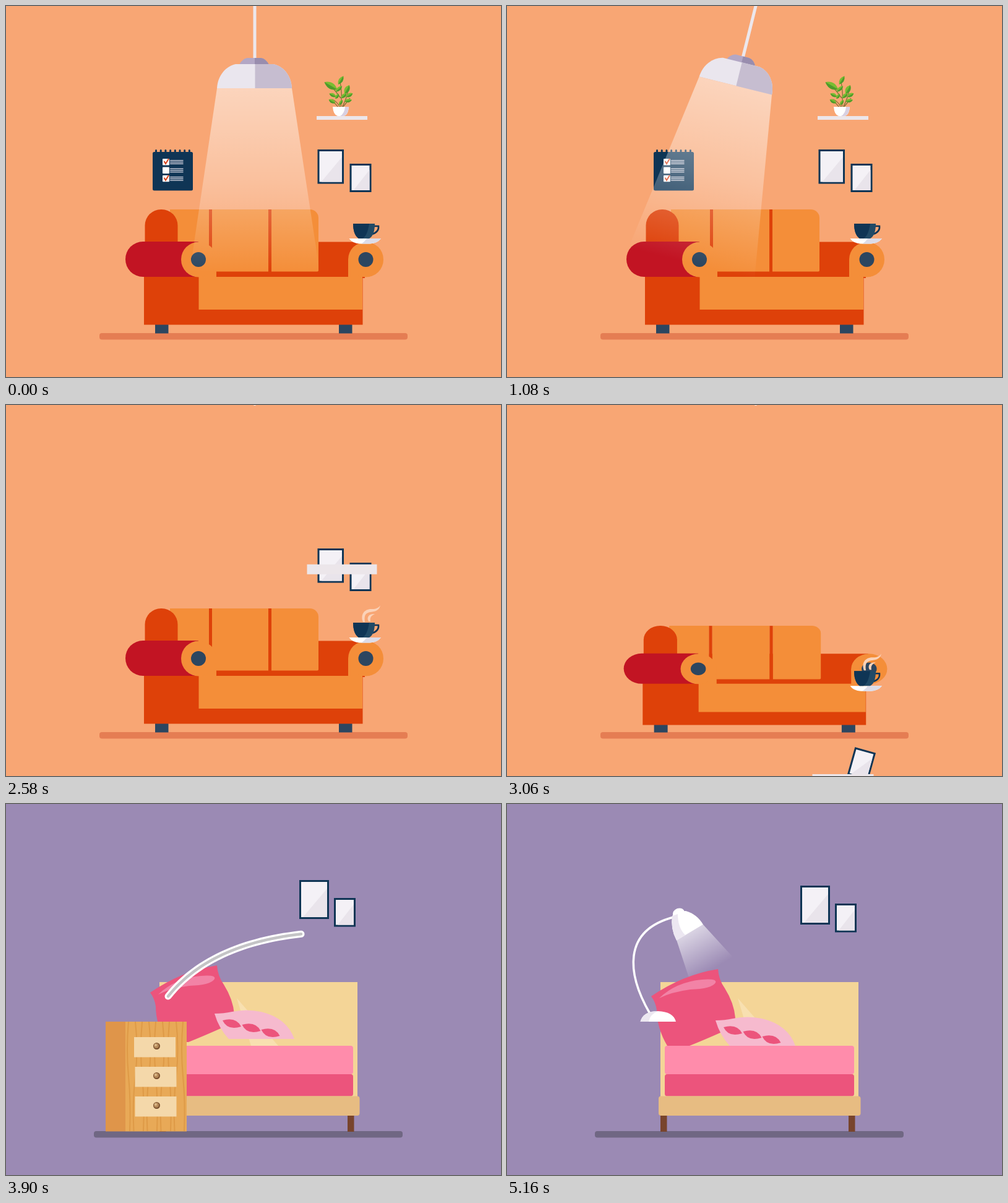
An HTML page with a canvas for the animation above (5.19 s loop, 800 by 600 pixels).

```html
<!DOCTYPE html>
<html lang="en">
<head>
<meta charset="utf-8">
<title>Living room to bedroom</title>
<style>
html, body { margin: 0; width: 100%; height: 100%; overflow: hidden; background: #f8a674; }
canvas { display: block; }
</style>
</head>
<body>
<canvas id="stage" width="800" height="600"></canvas>
<script>
const ctx = document.getElementById('stage').getContext('2d');
const LOOP = 5190;
const NAVY = '#0f3555', SLATE = '#2c4660', DARK = '#de4109', ORANGE = '#f48e39';
const CREAM = '#f4d597', PINK = '#ec547c', ROSE = '#ff8cab', PALE = '#ece6ea';

const clamp = v => Math.max(0, Math.min(1, v));
const part = (t, a, b) => clamp((t - a) / (b - a));

// Eased value through [time, value] pairs
function key(t, ...pts) {
  if (t <= pts[0][0]) return pts[0][1];
  for (let i = 1; i < pts.length; i++) {
    const [a, u] = pts[i - 1], [b, v] = pts[i];
    if (t <= b) return u + (v - u) * (1 - Math.cos(Math.PI * (t - a) / (b - a))) / 2;
  }
  return pts[pts.length - 1][1];
}

function box(c, x0, y0, x1, y1, r = 0) {
  ctx.fillStyle = c;
  ctx.beginPath();
  ctx.roundRect(x0, y0, x1 - x0, y1 - y0, r);
  ctx.fill();
}
function disc(c, x, y, rx, ry = rx, rot = 0) {
  ctx.fillStyle = c;
  ctx.beginPath();
  ctx.ellipse(x, y, rx, ry, rot, 0, 7);
  ctx.fill();
}
function shape(c, d) {
  ctx.fillStyle = c;
  ctx.fill(new Path2D(d));
}
function line(c, w, d) {
  ctx.strokeStyle = c;
  ctx.lineWidth = w;
  ctx.stroke(new Path2D(d));
}
// Draw with scale and rotation about a point, then a shift
function placed(x, y, o, draw) {
  const { dx = 0, dy = 0, sx = 1, sy = 1, rot = 0 } = o;
  ctx.save();
  ctx.translate(x + dx, y + dy);
  ctx.rotate(rot * Math.PI / 180);
  ctx.scale(sx, sy);
  ctx.translate(-x, -y);
  draw();
  ctx.restore();
}
function fade(x0, y0, x1, y1, ...stops) {
  const g = ctx.createLinearGradient(x0, y0, x1, y1);
  stops.forEach(([p, a]) => g.addColorStop(p, `rgba(255,255,255,${a})`));
  return g;
}
function streak(x, y0, y1, w) {
  ctx.fillStyle = fade(0, y0, 0, y1, [0, 0], [.12, 1], [.9, 1], [1, 0]);
  ctx.fillRect(x - w / 2, y0, w, y1 - y0);
}

// ---- living room ----
function pendant(t) {
  const rot = -key(t, [420, 0], [640, -14], [860, 14], [1080, -14], [1285, 34], [1470, -54], [1660, -10]);
  const rise = key(t, [1480, 0], [1660, -180]);
  if (t > 1660) {
    disc('#fbeee8', 402, 0, 2, 1);
    return;
  }
  placed(402, 0, { rot }, () => {
    ctx.translate(0, rise);
    ctx.globalAlpha = 1 - part(t, 1500, 1620);
    shape(fade(0, 133, 0, 430, [0, .52], [.5, .3], [1, 0]), 'M341 133H462L507 430H297Z');
    ctx.globalAlpha = 1;
    box('#ece7ec', 399.5, -10, 404.5, 86);
    shape('#b3a7c5', 'M377 95Q382 85 390 84H412Q420 85 425 95Z');
    shape('#998dae', 'M402 84H412Q420 85 425 95H402Z');
    shape('#eae6ee', 'M341 133C342 112 356 97 371 94H432C448 97 461 112 462 133Z');
    shape('#c6bdd0', 'M402.500 94H432C448 97 461 112 462 133H402.500Z');
  });
}

function calendar(t) {
  const s = Math.max(0, t - 1530);
  if (s > 850) return;
  const dy = s ? -76 + .00132 * (s - 240) ** 2 : 0;
  placed(270, 266, { dy, rot: s * .528 }, () => {
    box(NAVY, 237, 236, 302, 298.500, 2.500);
    for (let i = 0; i < 8; i++) box(NAVY, 241 + i * 7.700, 232, 244 + i * 7.700, 238, 1.500);
    for (let i = 0; i < 3; i++) {
      const y = 247 + i * 13.400;
      box('#fff', 253, y, 264, y + 10.500, 1);
      for (let j = 0; j < 3; j++) box('#b4bac9', 265, y + 2 + j * 2.700, 286.500, y + 3.600 + j * 2.700);
      if (i !== 1) line('#d9431c', 2, `M255.500 ${y + 4}l2.500 4l5 -8`);
    }
  });
}

function leaf(x, y, len, wide, deg) {
  placed(x, y, { rot: deg }, () => {
    shape('#79bd32', `M${x - len} ${y}Q${x} ${y - wide * 2} ${x + len} ${y}Q${x} ${y + wide * 2} ${x - len} ${y}`);
    shape('#4f9a2b', `M${x - len} ${y}Q${x} ${y + wide * 2} ${x + len} ${y}Z`);
  });
}
function plant(t) {
  if (t > 2500) return;
  const dy = key(t, [1560, 0], [1665, -58], [1740, -35], [1800, 0], [2040, 0], [2150, -22])
    + 480 * part(t, 2150, 2440) ** 2;
  const fall = part(t, 2150, 2400);
  const sy = key(t, [1540, 1], [1600, 1.12], [1740, 1.1], [1810, .88], [1880, 1]) + fall * .3;
  const sx = key(t, [1540, 1], [1600, .92], [1740, .93], [1810, 1.08], [1880, 1]) + fall * .25;
  if (t > 1690 && t < 1800 || t > 2180) {
    const k = dy + 35;
    streak(531.500, 57 + k, 81 + k, 3);
    streak(552.500, 44 + k, 82 + k, 3.500);
    streak(524, 77 + k, 92 + k, 3);
    streak(558, 76 + k, 100 + k, 2.500);
  }
  placed(540, 178, { dy, sx, sy }, () => {
    line('#857238', 1.300, 'M541 164Q544 142 540 123M540 164Q535 154 527 151M537 164Q532 157 528 155M543 164Q550 151 553 137M544 164Q552 154 556 149M541 149Q533 138 526 130');
    leaf(525, 129, 12, 5, 30);
    leaf(541, 120, 8, 3.500, -58);
    leaf(538, 134, 7, 3, -42);
    leaf(551, 135, 8, 4, -62);
    leaf(528, 144, 6, 3, 24);
    leaf(527, 154, 6, 3, 28);
    leaf(535, 146, 5, 2.500, -55);
    leaf(546, 145, 6, 3, -42);
    leaf(555, 144, 6, 3, -28);
    leaf(553, 153, 6, 3, -12);
    leaf(541, 156, 5, 2.500, -55);
    shape('#fff', 'M528 163H554Q553 177 545 178H536Q529 176 528 163');
    shape('#d8d0e2', 'M548 163H554Q553 177 545 178H540Q547 174 548 163');
  });
}

function shelf(t) {
  const k = Math.max(0, (t - 2490) / 90);
  const grow = clamp(k), y = Math.min(597, 178 + 78 * k * k);
  const w = 82 + 31 * grow - 14 * part(t, 2600, 2700);
  box(PALE, 543 - w / 2, y, 543 + w / 2, y + 6 + 10 * grow);
}

function picture(x, y, w, h) {
  box(NAVY, x, y, x + w, y + h);
  box('#f4f1f6', x + 3, y + 3, x + w - 3, y + h - 3);
  shape('#e9e4eb', `M${x + 6} ${y + h - 3}L${x + w - 3} ${y + h * .22}V${y + h - 3}Z`);
}
function dropPicture(t, start, x, y, w, h) {
  const s = Math.max(0, t - start);
  const dy = s ? -45 + .0042 * (s - 103.500) ** 2 : 0;
  if (dy > 400) return;
  placed(x + w / 2, y + h / 2, { dy, rot: s * .04 }, () => picture(x, y, w, h));
}

function cup(t) {
  const s = Math.max(0, t - 2760);
  const dy = s ? -60 + .0042 * (s - 119.500) ** 2 : 0;
  if (dy > 300) return;
  placed(580, 370, { dy }, () => {
    ctx.globalAlpha = part(t, 1480, 1680);
    shape('#fbd2b8', 'M577 351C572 338 580 329 592 330C598 330 602 328 605 324C603 334 594 334 588 335C579 337 579 343 580 351Z');
    shape('#fbd2b8', 'M586 350C582 343 587 337 596 338C589 341 588 345 589 350Z');
    ctx.globalAlpha = 1;
    shape('#fff', 'M554.500 376H606Q600 384 588 384.500H572Q560 384 554.500 376');
    shape('#dcdce8', 'M583 376H606Q600 384 588 384.500H574Q580 381 583 376');
    line(NAVY, 2.500, 'M595 356H602Q603 366 591 369');
    shape('#214a66', 'M561 352H596Q596 371 587 376H570Q561 370 561 352');
    shape(NAVY, 'M561 352H587Q584 372 576 376H570Q561 370 561 352');
  });
}

function sofa(t) {
  if (t >= 3485) return;
  const dy = key(t, [3060, 0], [3290, -190]) + 190 * part(t, 3290, 3460) ** 2;
  const sy = key(t, [2970, 1], [3060, .86], [3150, 1.08], [3290, 1], [3400, 1.08], [3460, 1], [3485, .45]);
  const w = 249 * (1 - part(t, 3060, 3420) ** 2);
  if (w > 3) box('#e57d53', 400 - w, 529, 400 + w, 539.500, 4);
  placed(400, 530, { dy, sy, sx: 1 + (1 - sy) * .15 }, () => {
    box(SLATE, 241, 512, 262.500, 529.500);
    box(SLATE, 538, 512, 559.500, 529.500);
    box(DARK, 223, 430, 576.500, 515.500);
    box(DARK, 328, 381.500, 580, 440);
    box(ORANGE, 265, 329, 328, 430);
    box(ORANGE, 333, 329, 424, 429.500);
    box(ORANGE, 429, 329, 505, 429.500, [0, 14, 2, 0]);
    box(DARK, 328, 329, 333, 430);
    box(DARK, 424, 329, 429, 430);
    box(DARK, 224.500, 329, 277.500, 395, [26, 26, 0, 0]);
    box('#c21423', 193, 381, 311, 438, [28.500, 0, 0, 28.500]);
    box(ORANGE, 311.500, 438, 576, 491);
    box(ORANGE, 312, 410, 340, 438.500);
    disc(ORANGE, 311.500, 410, 28.500);
    disc(SLATE, 311, 410, 12);
    box(ORANGE, 553, 410, 576, 439);
    disc(ORANGE, 581.500, 410, 28.500);
    disc(SLATE, 581.500, 410, 12);
  });
}

// ---- bedroom ----
function bed(t) {
  const sy = key(t, [3470, .3], [3510, .42], [3630, 1.14], [3720, .93], [3810, 1.03], [3890, 1]);
  const hop = key(t, [3780, 0], [3900, -11], [4020, 0]);
  placed(408, 530, { sy, sx: 1 + (1 - sy) * .149 }, () => {
    box('#78442c', 248, 500, 258.500, 530);
    box('#78442c', 552, 500, 562.500, 530);
    box(CREAM, 248, 288, 568, 480);
    shape('#f8e0b0', 'M373 314L440 391H396Z');
    placed(300, 391, { dy: hop * .55 }, () => {
      shape(PINK, 'M233 311Q284 276 341 267Q342 284 352 298Q367 322 369 346Q363 357 349 368Q320 381 295 391H259Q242 362 242 333Q240 320 233 311');
      shape('#f283a6', 'M246 314Q273 288 315 284Q340 282 337 289Q331 299 296 300Q266 304 246 314');
    });
    placed(400, 391, { dy: hop }, () => {
      shape('#f6bace', 'M337 350Q352 350 365 347Q389 342 412 347Q454 357 466 391H360Q344 374 337 350');
      [[365, 366], [396.500, 373], [427.500, 381]].forEach(([x, y]) => shape(PINK,
        `M${x - 15} ${y - 5}Q${x + 7} ${y - 11} ${x + 15} ${y + 5}Q${x - 7} ${y + 12} ${x - 15} ${y - 5}`));
    });
    box(ROSE, 255, 391, 561, 437, 4);
    box(PINK, 255, 437, 561, 472.500, 4);
    box('#e7bc82', 245, 472.500, 571.500, 504, 4);
  });
}

function dresser(t) {
  const sy = key(t, [3620, 0], [3750, 1.1], [3830, .96], [3890, 1]);
  if (t < 3620 || t >= 5160) return;
  placed(226, 530, { sy, sx: 2 - Math.max(sy, 1) }, () => {
    box('#df954a', 161, 352, 193, 529.500);
    box('#e8a957', 193, 352, 292, 529.500);
    for (let i = 0; i < 9; i++) {
      const x = 198 + i * 11, b = i % 2 ? 5 : -4;
      line('#de9a47', 2, `M${x} 352q${b} 45 0 88t${-b / 2} 89`);
    }
    for (let i = 0; i < 3; i++) {
      const y = 377 + i * 48, x = i ? 208.500 : 207;
      box('#f4d8aa', x, y, x + 67, y + 32.500);
      disc('#79502f', 243.500, y + 14.500, 5.500);
      disc('#b68a59', 243, y + 14, 4);
      disc('#dcb98a', 242, y + 13, 2);
    }
  });
}

// Arc left by the lamp flying to the dresser
function trail(t) {
  const head = part(t, 3750, 3900), tail = part(t, 3900, 4000);
  if (head <= 0 || tail >= 1) return;
  const arc = (a, b, c, w) => {
    ctx.beginPath();
    for (let i = 0; i <= 30; i++) {
      const u = a + (b - a) * i / 30, v = 1 - u;
      ctx.lineTo(v * v * 480 + 2 * v * u * 330 + u * u * 262, v * v * 210 + 2 * v * u * 226 + u * u * 311);
    }
    ctx.strokeStyle = c;
    ctx.lineWidth = w;
    ctx.stroke();
  };
  ctx.lineCap = 'round';
  if (tail === 0) line('#c6c2ca', 5, 'M478 211L497 209.500');
  arc(tail, head, '#fff', 11);
  arc(tail, head, '#c4c4c6', 4.500);
  ctx.lineCap = 'butt';
}

function deskPose(t) {
  return {
    sx: key(t, [3930, .2], [4050, 1.08], [4140, .97], [4220, 1]),
    sy: key(t, [3930, 0], [4050, 1.1], [4140, .96], [4220, 1]),
    rot: key(t, [3930, 0], [4080, -7], [4200, -5], [4300, 3], [4410, 0])
  };
}
function deskBeam(t) {
  ctx.globalAlpha = part(t, 4200, 4320);
  placed(244, 352, deskPose(t), () =>
    shape(fade(296, 208, 331, 268, [0, .62], [1, 0]), 'M274 220L317 195L369 252L298 293Z'));
  ctx.globalAlpha = 1;
}
function deskLamp(t) {
  if (t < 3930) return;
  const pose = deskPose(t);
  placed(244, 352, pose, () => {
    line('#fff', 3.500, 'M231 339C194 275 186 205 269 183');
    shape('#fff', 'M268 181Q267 172 275 169Q284 167 287 174L283 184Z');
    shape('#fff', 'M267 181Q275 173 289 173Q307 178 317 195L274 220.500Q264 202 267 181');
    shape('#ece7f1', 'M267 181L276 178Q276 200 288 212L274 220.500Q264 202 267 181');
  });
  placed(244, 352, { sx: pose.sx, sy: pose.sy }, () => {
    shape('#fff', 'M215.500 352Q220 335 244 335Q269 336 273 352Z');
    shape('#ece7f1', 'M215.500 352Q220 335 244 335Q231 340 229 352Z');
  });
}

function bedroomPictures(t) {
  const s = key(t, [3640, 0], [3780, 1.08], [3880, 1]);
  const dy = key(t, [3780, 0], [3900, -9], [4020, 0]);
  if (s <= 0) return;
  placed(497.500, 163, { dy, sx: s, sy: s }, () => picture(474, 132, 48, 63));
  placed(548, 184, { dy, sx: s, sy: s }, () => picture(530, 161, 35, 46.500));
}

function frame(now) {
  const t = now % LOOP;
  box('#f8a674', 0, 0, 800, 600);
  if (t < 3720) {
    dropPicture(t, 2590, 503.500, 232, 42.500, 55.500);
    dropPicture(t, 2670, 555.500, 255, 35, 46);
    shelf(t);
    plant(t);
    calendar(t);
    sofa(t);
    cup(t);
    pendant(t);
  }
  if (t > 3515) disc('#9b8ab4', 400, 534, (t - 3515) * 5.100);
  if (t > 3430 && t < 3570) {
    const k = (t - 3510) * .5;
    ctx.globalAlpha = 1 - part(t, 3520, 3570);
    streak(335, 382 + k, 572 + k, 8);
    streak(357, 324 + k, 500 + k, 8);
    streak(420, 338 + k, 500 + k, 10);
    streak(435, 382 + k, 524 + k, 5);
    ctx.globalAlpha = 1;
  }
  if (t >= 3485) {
    const w = key(t, [3475, 10], [3510, 87.500], [3620, 262], [3700, 249.500]);
    box('#706783', 391.500 - w, 529, 391.500 + w, 539.500, 4);
    bedroomPictures(t);
    deskBeam(t);
    bed(t);
    dresser(t);
    trail(t);
    deskLamp(t);
  }
}

const start = performance.now();
function tick() {
  frame(performance.now() - start);
  requestAnimationFrame(tick);
}
tick();
</script>
</body>
</html>
```
